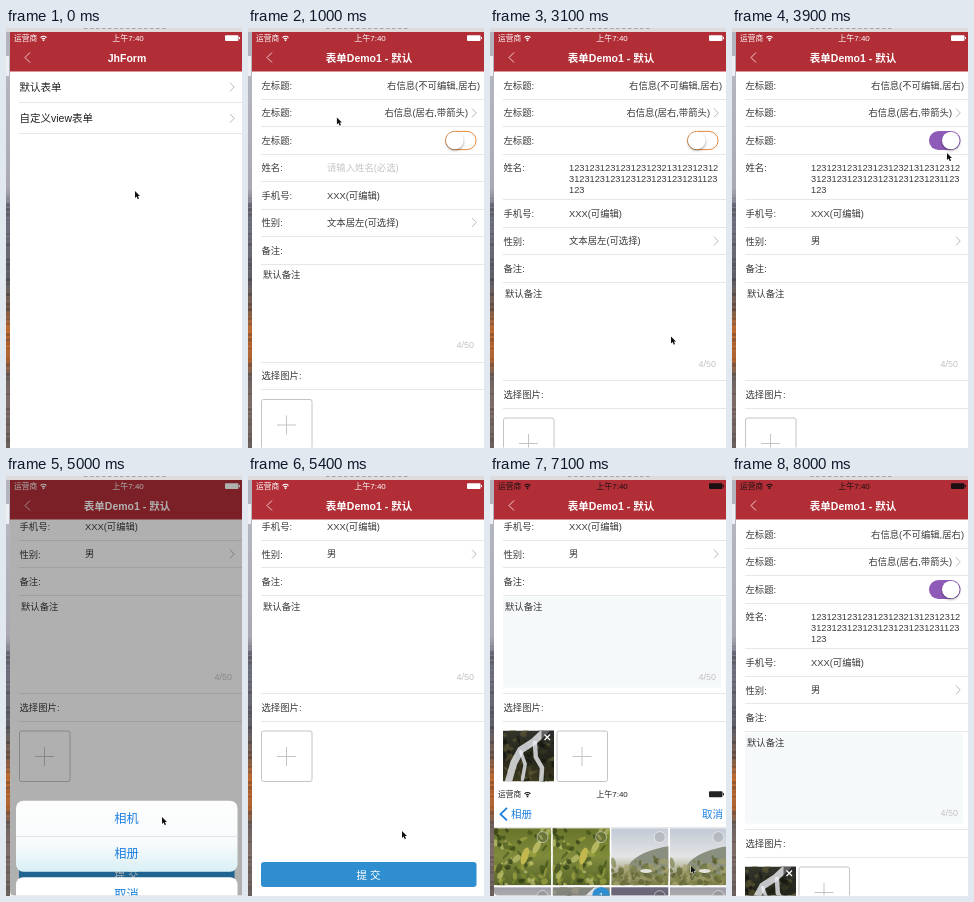
Animation, 236 px wide and 420 px high, one loop 8100 ms. Source, as an HTML page with a canvas:

```html
<!DOCTYPE html>
<html lang="zh">
<head>
<meta charset="utf-8">
<style>
html, body { margin: 0; width: 100%; height: 100%; overflow: hidden; background: #fff; }
canvas { display: block; width: 236px; height: 420px; }
</style>
</head>
<body>
<canvas id="stage"></canvas>
<script>
const W = 236, H = 420, LOOP = 8100, LEFT = 4, TOP = 4, BAR = 43.5;
const FONT = '"Liberation Sans", "Noto Sans CJK SC", "Noto Sans CJK", sans-serif';
const RED = '#b12e37', BLUE = '#1b7fe0', BUTTON = '#2f8ed0', INK = '#3a3a3a', LINE = '#e2e2e2';
const NAME = '123'.repeat(6) + '213' + '123'.repeat(11) + '1123' + '123';
const PER_LINE = 29;

const canvas = document.getElementById('stage');
const dpr = window.devicePixelRatio || 1;
canvas.width = W * dpr;
canvas.height = H * dpr;
const c = canvas.getContext('2d');

const clamp = v => Math.max(0, Math.min(1, v));
const part = (t, a, b) => clamp((t - a) / (b - a));
const easeOut = p => 1 - (1 - p) ** 3;
const easeBoth = p => p * p * (3 - 2 * p);
const lerp = (a, b, p) => a + (b - a) * p;

// Piecewise path through [time, x, y] stops
function along(stops, t) {
  for (let i = 1; i < stops.length; i++) {
    const [t0, x0, y0] = stops[i - 1], [t1, x1, y1] = stops[i];
    if (t < t1) {
      const p = easeBoth(part(t, t0, t1));
      return [lerp(x0, x1, p), lerp(y0, y1, p)];
    }
  }
  return stops[stops.length - 1].slice(1);
}

function random(seed) {
  return () => (seed = (seed * 16807) % 2147483647) / 2147483647;
}

function rect(x, y, w, h, fill) {
  c.fillStyle = fill;
  c.fillRect(x, y, w, h);
}

function roundPath(x, y, w, h, r) {
  c.beginPath();
  c.roundRect(x, y, w, h, r);
}

function round(x, y, w, h, r, fill) {
  roundPath(x, y, w, h, r);
  c.fillStyle = fill;
  c.fill();
}

function disc(x, y, r, fill) {
  c.beginPath();
  c.arc(x, y, r, 0, Math.PI * 2);
  c.fillStyle = fill;
  c.fill();
}

function blob(x, y, rx, ry, angle, fill) {
  c.beginPath();
  c.ellipse(x, y, rx, ry, angle, 0, Math.PI * 2);
  c.fillStyle = fill;
  c.fill();
}

function ring(x, y, r, color, width) {
  c.beginPath();
  c.arc(x, y, r, 0, Math.PI * 2);
  c.strokeStyle = color;
  c.lineWidth = width;
  c.stroke();
}

function text(s, x, y, size, color = INK, align = 'left', weight = 400) {
  c.font = `${weight} ${size}px ${FONT}`;
  c.textAlign = align;
  c.textBaseline = 'alphabetic';
  c.fillStyle = color;
  c.fillText(s, x, y + size * 0.37);
}

function path(points, color, width = 1) {
  c.beginPath();
  points.forEach(([x, y], i) => i ? c.lineTo(x, y) : c.moveTo(x, y));
  c.strokeStyle = color;
  c.lineWidth = width;
  c.stroke();
}

function chevron(x, y, dx, dy, color, width = 1) {
  path([[x, y - dy], [x + dx, y], [x, y + dy]], color, width);
}

const arrow = y => chevron(224, y, 4.2, 4.4, '#b9b9b9');
const rule = (y, x = 13) => rect(x, Math.round(y), W - x, 0.8, LINE);

function gradient(y0, y1, stops) {
  const g = c.createLinearGradient(0, y0, 0, y1);
  stops.forEach(([p, color]) => g.addColorStop(p, color));
  return g;
}

function desktop() {
  rect(0, 0, W, H, '#fff');
  rect(0, 0, LEFT, H, gradient(0, H, [
    [0, '#b4b3bd'], [0.12, '#b3b5c0'], [0.38, '#aaa9b3'], [0.43, '#77798a'],
    [0.6, '#5f6069'], [0.67, '#80604f'], [0.72, '#c56d32'], [0.79, '#ae6433'],
    [0.83, '#6f6361'], [0.9, '#83716b'], [1, '#6a5f5d']]));
  const rnd = random(41);
  for (let y = 170; y < H; y += 5) rect(0, y, LEFT, 1 + rnd() * 3, `rgba(50,42,40,${rnd() * 0.35})`);
  rect(0, 28, 3, 20, '#eceef2');
  rect(0, 0, W, TOP, '#dedcdd');
  for (let x = 78; x < 160; x += 6) rect(x, 0, 3.5, 1, '#a8a5a6');
}

function statusBar(color) {
  text('运营商', 8, 10, 7.7, color);
  for (const r of [2.2, 4.2]) {
    c.beginPath();
    c.arc(37.5, 12.6, r, -Math.PI * 0.75, -Math.PI * 0.25);
    c.strokeStyle = color;
    c.lineWidth = 1.2;
    c.stroke();
  }
  disc(37.5, 12.3, 0.9, color);
  text('上午7:40', 122, 10, 8, color, 'center', 500);
  round(219, 7.2, 13.5, 5.8, 1, color);
  rect(233, 9, 1, 2.2, color);
}

function title(s, x, alpha) {
  c.globalAlpha = alpha;
  text(s, x, 30, 10.5, '#fff', 'center', 600);
  c.globalAlpha = 1;
}

function navBar(push, status) {
  rect(LEFT, TOP, W, BAR - TOP, RED);
  statusBar(status);
  chevron(24, 29.5, -5, 5, '#f3dfe0', 0.9);
  if (push < 1) title('JhForm', 121 - push * 70, 1 - push);
  if (push > 0) title('表单Demo1 - 默认', 121 + (1 - push) * 90, push);
}

function listPage(pressed) {
  rect(LEFT, BAR, W, H, '#fff');
  if (pressed) rect(LEFT, BAR, W, 31, '#d9d9d9');
  ['默认表单', '自定义view表单'].forEach((s, i) => {
    const y = 59 + i * 31.3;
    text(s, 13.5, y, 10.5, '#222');
    arrow(y);
    rule(y + 15, 13);
  });
}

function toggle(y, on) {
  const p = easeBoth(on);
  round(197, y - 9.6, 31.6, 19.2, 9.6, p > 0 ? '#8e5bb8' : '#fff');
  if (p < 1) {
    c.globalAlpha = 1 - p;
    round(197.5, y - 9.1, 30.6, 18.2, 9.1, '#fff');
    c.strokeStyle = '#e58a3c';
    c.lineWidth = 1;
    c.stroke();
    c.globalAlpha = 1;
  }
  c.save();
  c.shadowColor = 'rgba(0,0,0,.4)';
  c.shadowBlur = 2.5 * dpr;
  c.shadowOffsetY = 1.2 * dpr;
  disc(lerp(206.8, 218.8, p), y, 8.8, '#fff');
  c.restore();
}

function addBox(x, y) {
  roundPath(x + 0.5, y + 0.5, 50.5, 50.5, 2);
  c.strokeStyle = '#c4c4c4';
  c.lineWidth = 1;
  c.stroke();
  path([[x + 16, y + 26], [x + 35, y + 26]], '#c4c4c4');
  path([[x + 25.5, y + 16.5], [x + 25.5, y + 35.5]], '#c4c4c4');
}

function formPage(s) {
  const size = 9.35;
  const label = (str, y) => text(str, 13.5, y, size);
  rect(LEFT, BAR, W, H, '#fff');
  c.save();
  c.translate(0, -s.scroll);

  for (let i = 0; i < 3; i++) {
    label('左标题:', 57.4 + i * 27.5);
    rule(70.6 + i * 27.5);
  }
  text('右信息(不可编辑,居右)', 232, 57.4, size, INK, 'right');
  text('右信息(居右,带箭头)', 220, 84.9, size, INK, 'right');
  arrow(84.9);
  toggle(112.5, s.toggle);

  label('姓名:', 139.5);
  const typed = NAME.slice(0, s.chars);
  const lines = typed.match(new RegExp(`.{1,${PER_LINE}}`, 'g')) || [''];
  lines.forEach((line, i) => text(line, 79, 139.2 + i * 11, 9.25));
  if (!s.chars) text('请输入姓名(必选)', 79, 139.2, size, '#c4c4c8');
  if (s.editing) {
    const last = lines[lines.length - 1];
    c.font = `9.25px ${FONT}`;
    rect(79 + c.measureText(last).width, 133.5 + (lines.length - 1) * 11, 1.2, 11.5, '#3f6fd8');
  }

  let y = 126 + Math.max(27.5, 13 + 11 * lines.length);
  rule(y - 0.6);
  label('手机号:', y + 14);
  text('XXX(可编辑)', 79, y + 13.6, size);
  rule(y + 27);
  label('性别:', y + 41.5);
  text(s.gender, 79, y + 41, size);
  arrow(y + 41);
  rule(y + 54.2);
  label('备注:', y + 69);
  rule(y + 82);

  y += 82.5;
  if (s.photo) rect(13, y + 2, 218, 90, '#f5f9fa');
  text('默认备注', 15, y + 11, size);
  text('4/50', 226, y + 80.8, 9, '#c2c2c6', 'right');
  rule(y + 97.5);
  label('选择图片:', y + 111.7);
  rule(y + 125);

  const boxY = y + 135;
  if (s.photo) {
    photo('stream', 13, boxY, 51);
    rect(51.5, boxY, 12.5, 13, 'rgba(40,40,40,.65)');
    path([[54.5, boxY + 4], [60, boxY + 9.5]], '#fff', 1.2);
    path([[60, boxY + 4], [54.5, boxY + 9.5]], '#fff', 1.2);
  }
  addBox(s.photo ? 66.5 : 13, boxY);

  round(13, y + 266.5, 215.5, 25, 3, BUTTON);
  text('提 交', 120.5, y + 279.2, 10.5, '#fff', 'center');
  c.restore();
}

function inputBar(p) {
  if (p <= 0) return;
  const y = lerp(H, 392.5, p);
  rect(LEFT, y, W, 30, 'rgba(246,246,247,.96)');
  rect(LEFT, y, W, 0.8, '#d4d4d6');
  const mid = y + 13.8;
  chevron(21.5, mid, -6.5, 6.2, '#c8c8ca', 1.1);
  chevron(41, mid, 6.5, 6.2, '#808084', 1.1);
  text('请输入姓名(必选)', 130.5, mid, 8.4, '#b0b0b4', 'center');
  text('完成', 233, mid, 10.5, '#77777b', 'right');
}

function actionSheet(p) {
  if (p <= 0) return;
  rect(LEFT, TOP, W, H, `rgba(0,0,0,${0.38 * p})`);
  const y = lerp(419, 303, p);
  const x = 10, w = 221.5, row = 35.5;
  round(x, y, w, row * 2, 7.5, gradient(y, y + row * 2, [
    [0, '#fdfdfd'], [0.6, '#f8fbfc'], [1, '#d9eff5']]));
  rect(x, y + row, w, 0.7, '#d5dadd');
  round(x, y + row * 2 + 5.5, w, row, 7.5, '#fff');
  ['相机', '相册'].forEach((s, i) => text(s, 120.5, y + row * (i + 0.5), 12.2, BLUE, 'center'));
  text('取消', 120.5, y + row * 2.5 + 5.5, 12.2, BLUE, 'center', 500);
}

const SCENES = {
  leaf: { sky: ['#68752a', '#7f8a3c', '#58662a'], dots: ['#c3c774', '#7f8f2d', '#2c3a14', '#a3a844', '#3f5219'] },
  grass: { sky: ['#c3cad6', '#e3e4e4', '#77793f'], dots: ['#7b8046', '#595f2e', '#a3a06a'], from: 0.55 },
  dusk: { sky: ['#9f9ea8', '#cfc9bf', '#2a2610'], dots: ['#17160a', '#5d5520', '#39330f'], from: 0.6 },
  stream: { sky: ['#33342c', '#24251c', '#3d3a20'], dots: ['#15160f', '#5b5633', '#37371f'] },
  veil: { sky: ['#8d86a0', '#6f6a78', '#3f4a2c'], dots: ['#2e381c', '#65734a', '#49542f'], from: 0.62 }
};

// Soft stand-in scenery: gradient, seeded blobs and a fall of water
function photo(kind, x, y, s) {
  const { sky, dots, from = 0 } = SCENES[kind];
  const rnd = random(kind.length * 977 + kind.charCodeAt(0));
  const water = (points, width, color = 'rgba(236,238,243,.8)') => path(points, color, width);
  c.save();
  c.beginPath();
  c.rect(x, y, s, s);
  c.clip();
  rect(x, y, s, s, gradient(y, y + s, [[0, sky[0]], [0.5, sky[1]], [1, sky[2]]]));
  c.translate(x, y);
  c.scale(s / 57.5, s / 57.5);
  c.lineCap = 'round';
  if (kind === 'grass') blob(50, 33, 34, 13, -0.25, '#8a9080');
  c.globalAlpha = 0.65;
  for (let i = 0; i < 80; i++) {
    blob(rnd() * 58, (from + rnd() * (1 - from)) * 58, 1.5 + rnd() * 4, 1 + rnd() * 2,
      rnd() * 3, dots[i % dots.length]);
  }
  c.globalAlpha = 1;
  if (kind === 'leaf') {
    blob(31, 28, 3.5, 9, 0.3, '#c3b84e');
    blob(43, 19, 3, 7, 0.5, '#b5b860');
  } else if (kind === 'grass') {
    blob(35, 43, 6, 2, 0, '#e4e4dc');
  } else if (kind === 'dusk') {
    blob(4, 34, 17, 24, 0, 'rgba(36,31,12,.85)');
    blob(38, 30, 18, 9, 0.1, 'rgba(240,236,226,.85)');
    blob(40, 52, 26, 12, 0, 'rgba(44,40,16,.65)');
  } else if (kind === 'stream') {
    water([[48, 0], [34, 13], [20, 22], [12, 37], [6, 58]], 8);
    water([[36, 14], [37, 30], [44, 42], [43, 58]], 5);
    water([[20, 24], [25, 38], [22, 55]], 4);
  } else if (kind === 'veil') {
    rect(0, 0, 58, 8, 'rgba(80,78,88,.5)');
    blob(5, 30, 13, 19, 0, 'rgba(58,62,46,.75)');
    blob(55, 30, 11, 19, 0, 'rgba(62,60,60,.75)');
    rect(20, 12, 20, 28, gradient(12, 40, [[0, '#c4bcd8'], [1, '#b0a9c0']]));
  }
  c.restore();
}

const ALBUM = ['leaf', 'leaf', 'grass', 'grass', 'dusk', 'stream', 'veil', 'dusk', 'stream', 'veil'];

function album(p, picked) {
  if (p <= 0) return;
  c.save();
  c.translate(0, (H - TOP) * (1 - p));
  rect(LEFT, TOP, W, H, '#fff');
  statusBar('#222');
  chevron(17, 30, -6.5, 6.3, BLUE, 1.8);
  text('相册', 21, 30, 10.5, BLUE);
  text('取消', 233, 30, 10.5, BLUE, 'right');
  rule(42.5, LEFT);

  ALBUM.forEach((kind, i) => {
    const x = LEFT + (i % 4) * 58.6, y = 44 + Math.floor(i / 4) * 59;
    photo(kind, x, y, 57.2);
    if (i === 5 && picked) {
      rect(x, y, 57.2, 57.2, 'rgba(255,255,255,.4)');
      disc(x + 48.5, y + 8.8, 9, BUTTON);
      text('1', x + 48.5, y + 8.8, 8.7, '#fff', 'center');
    } else {
      disc(x + 48.5, y + 9, 5.5, 'rgba(90,90,90,.2)');
      ring(x + 48.5, y + 9, 5.5, 'rgba(255,255,255,.55)', 0.9);
    }
  });

  rect(LEFT, 388.5, W, 32, '#fcfcfc');
  rule(388.5, LEFT);
  const tint = picked ? BLUE : '#aaa';
  text('预览', 11.5, 405, 10, tint);
  text('原图', 36.5, 405, 10, tint);
  ring(61.7, 405, 4, tint, 0.9);
  round(181, 395.2, 49.5, 18.5, 2, picked ? BUTTON : '#a4cdea');
  text(picked ? '完成(1/8)' : '完成', 205.7, 404.8, 9.5, '#fff', 'center');
  c.restore();
}

const POINTER = [
  [0, 129, 163], [150, 129, 163], [450, 72, 62], [900, 72, 62], [1150, 120, 140],
  [1900, 130, 155], [2400, 160, 169], [2550, 160, 169], [2800, 222, 405], [2950, 222, 405],
  [3250, 140, 212], [3400, 140, 212], [3650, 212, 113], [3750, 212, 113], [3900, 215, 125],
  [4050, 150, 300], [4500, 140, 220], [4700, 40, 281], [4800, 40, 281], [5000, 156, 341],
  [5200, 154, 355], [5500, 154, 355], [5950, 110, 112], [6050, 110, 112], [6200, 61, 112],
  [6350, 61, 112], [6750, 205, 405], [7050, 205, 405], [7350, 150, 200], [7700, 150, 320]
];

function pointer(t) {
  if (t >= 7800) return;
  const [x, y] = along(POINTER, t);
  c.save();
  c.translate(x, y);
  c.beginPath();
  [[0, 0], [0, 7], [1.6, 5.6], [2.8, 8.2], [4, 7.6], [2.9, 5.1], [5, 5]]
    .forEach(([px, py]) => c.lineTo(px, py));
  c.closePath();
  c.strokeStyle = '#fff';
  c.lineWidth = 1;
  c.stroke();
  c.fillStyle = '#111';
  c.fill();
  c.restore();
}

function typedCount(t) {
  return Math.floor(56 * part(t, 1250, 2200) + 5 * part(t, 2450, 2700) + 1e-6);
}

function draw(t) {
  c.setTransform(dpr, 0, 0, dpr, 0, 0);
  desktop();
  c.save();
  roundPath(LEFT, TOP, W - LEFT + 4, H - TOP - 0.5, [0, 0, 4, 4]);
  c.clip();

  const push = easeOut(part(t, 500, 900));
  if (push < 1) {
    c.save();
    c.translate(-70 * push, 0);
    listPage(t >= 450);
    c.restore();
  }
  if (push > 0) {
    c.save();
    c.translate((W - LEFT) * (1 - push), 0);
    formPage({
      scroll: 135 * (easeBoth(part(t, 4000, 4500)) - easeBoth(part(t, 7300, 7850))) - part(t, 7850, 7950),
      chars: typedCount(t),
      editing: t >= 1150 && t < 2850,
      toggle: part(t, 3650, 3850),
      gender: t < 3350 ? '文本居左(可选择)' : '男',
      photo: t >= 6900
    });
    c.restore();
  }
  // The album leaves the status bar dark
  navBar(push, t < 5450 ? '#fff' : '#1c1012');
  inputBar(easeOut(part(t, 1150, 1350)) - easeBoth(part(t, 2850, 3050)));
  actionSheet(easeOut(part(t, 4850, 5200)) * (1 - easeBoth(part(t, 5230, 5390))));
  album(easeOut(part(t, 5450, 5800)) - easeBoth(part(t, 6900, 7200)), t >= 6000);
  c.restore();
  pointer(t);
}

function frame() {
  const t = performance.now() % LOOP;
  draw(Math.floor(t / 100) * 100);
  requestAnimationFrame(frame);
}
frame();
</script>
</body>
</html>
```
